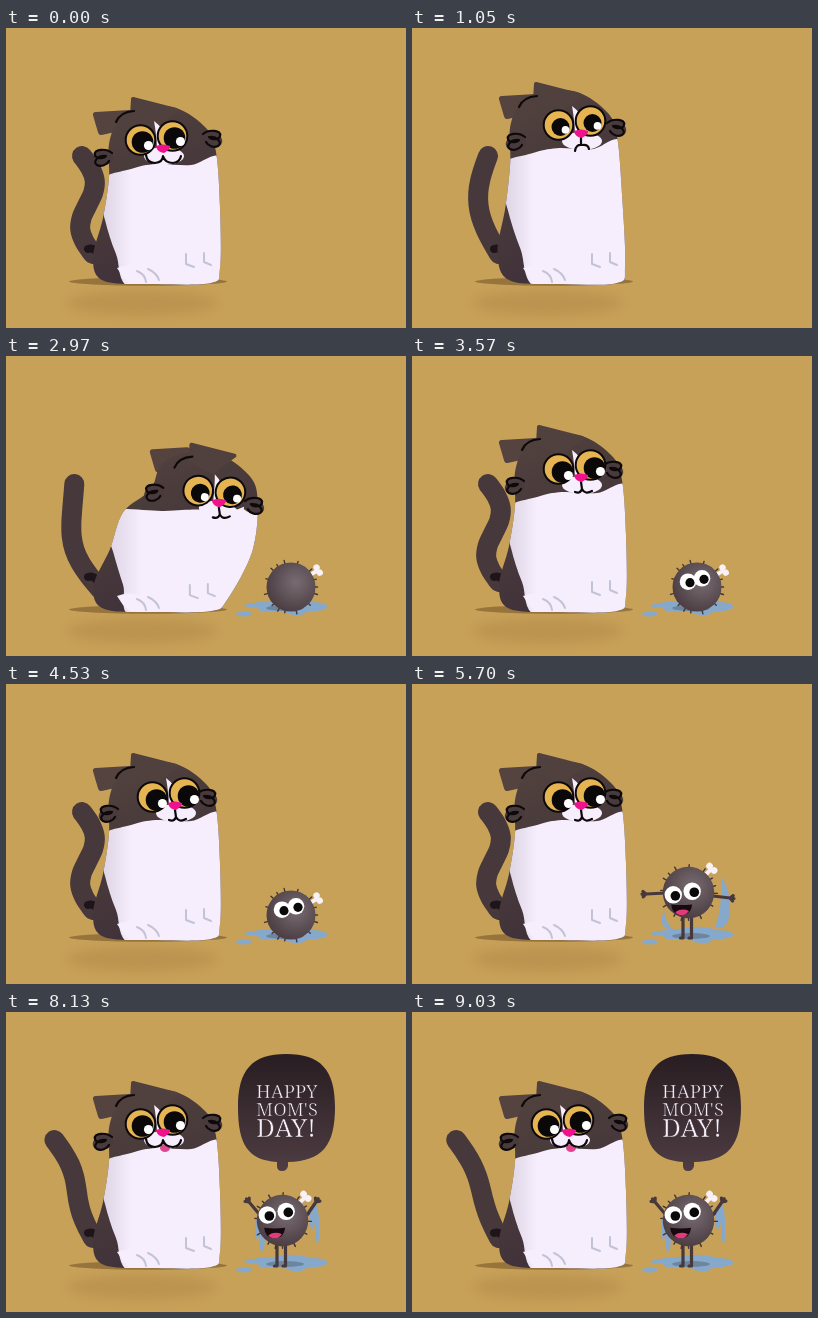
Recreate the animation shown at these times as an HTML page. Size 400x300 px, loop 9060 ms.

```html
<!DOCTYPE html>
<html lang="en">
<head>
<meta charset="utf-8">
<title>Cat and hairball</title>
<style>
html, body { margin: 0; width: 100%; height: 100%; overflow: hidden; background: #c8a159; }
svg { display: block; width: 100vw; height: 100vh; }
path { stroke-linecap: round; stroke-linejoin: round; }
.ink { fill: none; stroke: #0d090b; stroke-width: 2.2; }
.toe { fill: none; stroke: #c3c3d8; stroke-width: 2; }
.limb { fill: none; stroke: #46383b; stroke-width: 3.2; }
text { font-family: "Noto Serif", "Liberation Serif", serif; font-weight: 300; fill: #f6effa; stroke: #33272c; stroke-width: .5; }
</style>
</head>
<body>
<svg viewBox="0 0 400 300">
  <defs>
    <linearGradient id="fur" x1="0" y1="0" x2=".4" y2="1">
      <stop offset="0" stop-color="#54433f"/><stop offset=".5" stop-color="#483a3b"/><stop offset="1" stop-color="#40313a"/>
    </linearGradient>
    <linearGradient id="white">
      <stop offset="0" stop-color="#d8cedf"/><stop offset=".25" stop-color="#f6eefc"/>
    </linearGradient>
    <linearGradient id="night" x2="0" y2="1">
      <stop offset="0" stop-color="#281d22"/><stop offset="1" stop-color="#4e3d42"/>
    </linearGradient>
    <radialGradient id="hair" cx=".6" cy=".4" r=".65">
      <stop offset="0" stop-color="#786c72"/><stop offset="1" stop-color="#4a3c41"/>
    </radialGradient>
    <filter id="soft" x="-30%" y="-90%" width="160%" height="280%"><feGaussianBlur stdDeviation="6"/></filter>
    <clipPath id="bodyClip"><path id="clipShape"/></clipPath>
    <g id="tuft">
      <path fill="#493a3c" d="M-9-5C-2-11 11-10 9-3C14 2 10 9 4 8C-2 8-6 5-9 3Z"/>
      <path class="ink" d="M-8-5C-2-10 11-9 9-3C8 1 0 1-2-2C6-3 12 4 7 7C3 9-3 7-5 3"/>
    </g>
    <g id="eye">
      <circle r="14.800" fill="#e6b552" stroke="#0d090b" stroke-width="2"/>
      <g class="pupil"><circle r="1" fill="#0b080a"/><circle cx=".55" cy=".32" r=".42" fill="#fff"/></g>
    </g>
    <g id="ballEye"><circle r="8.300" fill="#fff"/><circle cx="2" cy="1" r="4.600" fill="#0b080a"/></g>
  </defs>
  <rect width="400" height="300" fill="#c8a159"/>
  <ellipse cx="136" cy="275" rx="76" ry="13" fill="#a87f40" opacity=".38" filter="url(#soft)"/>
  <ellipse cx="142" cy="253.500" rx="79" ry="4.200" fill="#8c6936" opacity=".8"/>

  <path id="tail" fill="none" stroke="#47393b" stroke-width="20"/>
  <path d="M82 221Q88 219 92 226" fill="none" stroke="#1e151a" stroke-width="8"/>
  <path id="earL" fill="#54433f" stroke="#54433f" stroke-width="6" d="M90 87L124 85V100L104 102L95 104Z"/>
  <path id="body" fill="url(#fur)"/>
  <g id="earR">
    <path fill="#50403e" stroke="#50403e" stroke-width="4" d="M127 71L170 82L148 98L126 87Z"/>
    <path class="ink" d="M110 94Q114 84 128 83"/>
  </g>
  <g clip-path="url(#bodyClip)"><path id="belly" fill="url(#white)"/></g>
  <path id="paw" class="toe" d="M180 226V236L188 239M198 225V234L205 237"/>
  <path fill="#f6eefc" d="M111 240Q122 235 138 240Q153 239 156 254Q144 257 124 255Q119 251 117 249Z"/>
  <path class="toe" d="M131 243Q139 246 140 254M142 241Q151 245 153 252"/>

  <use id="tuftL" href="#tuft"/>
  <use id="tuftR" href="#tuft"/>
  <g id="face">
    <path fill="#f6eefc" d="M-9-28Q1-21 7-5L-6-2Q-7-17-9-28Z"/>
    <ellipse cx="1" cy="7" rx="20" ry="9" fill="#f6eefc"/>
    <use id="eyeL" href="#eye"/>
    <use id="eyeR" href="#eye"/>
  </g>
  <g id="mouth">
    <g id="gape">
      <path fill="#790c34" stroke="#260812" d="M-16 8Q-3 3 11 8Q10 28 12 42Q15 67-10 69Q-34 70-31 52Q-20 32-16 8Z"/>
      <path fill="#d9489c" d="M-23 30Q-12 23-6 34Q2 48-9 51Q-24 55-31 50Q-29 41-23 30Z"/>
      <path fill="#fff" d="M-16 8L-12 18L-7 7ZM0 7L3 17L8 8Z"/>
    </g>
    <ellipse id="tongue" cx="2" cy="15" rx="5" ry="4" fill="#e2458f"/>
    <path id="smile" class="ink" d="M-17 6Q-16 14-8 14Q0 13 0 7Q2 14 10 14Q17 13 18 7"/>
    <path id="frown" class="ink" d="M0 3V10M-6 17Q-5 10 1 11Q7 10 8 15"/>
    <path id="small" class="ink" d="M0 4L1 11Q-1 16-6 14M1 11Q4 17 11 13"/>
    <path fill="#f0128c" d="M-7-3Q0-6 7-3Q8 0 1 4Q-6 3-7-3Z"/>
  </g>

  <g id="puddle" fill="#86a8ca">
    <path d="M-41-2Q-25-6-12-6Q10-11 25-5Q44-5 42 1Q34 5 22 4Q21 9 7 8Q0 4-15 4Q-30 5-27 0Q-38 2-41-2Z"/>
    <ellipse cx="-41" cy="7" rx="8" ry="2.500"/>
  </g>
  <ellipse id="ballShadow" cx="279" cy="252" rx="19" ry="3" fill="#5e6e80" opacity=".6"/>
  <path id="splash" fill="#86a8ca" d="M309 192Q322 212 316 238Q309 247 303 243Q311 222 309 192ZM252 225Q253 240 262 246Q253 246 249 238Z"/>
  <path id="drips" fill="#86a8ca" d="M303 198L311 193Q314 205 313 228Q311 233 309 228V210Q307 222 304 214ZM249 205L257 212Q260 224 258 238Q255 242 254 235L252 222Q250 232 249 226Z"/>
  <path id="limbs" class="limb"/>
  <g id="ball">
    <g id="roll">
      <path id="spikes" stroke="#41353a" stroke-width="1.400"/>
      <g id="bone" fill="#f8f1f8" transform="rotate(-32)">
        <path d="M20-2H31V2H20Z"/><circle cx="32" cy="-3" r="3.200"/><circle cx="32" cy="3" r="3.200"/>
      </g>
      <circle r="24.500" fill="url(#hair)"/>
    </g>
    <path id="curl" class="ink" d="M-5-15C4-14 2-6-3-5C3-5 4 7-5 7"/>
    <g id="ballFace">
      <use id="ballEyeL" href="#ballEye"/>
      <use id="ballEyeR" href="#ballEye"/>
      <g id="ballMouth">
        <path fill="#17090d" d="M-10-4Q0-3 10-4Q9 6 0 6Q-9 6-10-4Z"/>
        <path fill="#e23a7a" d="M-6 3Q0-1 7 2Q4 6 0 6Q-4 6-6 3Z"/>
      </g>
    </g>
  </g>

  <g id="bubble">
    <path fill="url(#night)" d="M280 42C315 42 329 58 329 95C329 133 317 149 282 150V154Q281 159 276 159Q271 159 271 154V150C242 148 232 133 232 95C232 58 246 42 280 42Z"/>
    <text x="250" y="86" font-size="18.500">HAPPY</text>
    <text x="250" y="103.500" font-size="18.300">MOM'S</text>
    <text x="250" y="124.500" font-size="26">DAY!</text>
  </g>
</svg>
<script>
const LOOP = 9060;
const el = {};
document.querySelectorAll('[id]').forEach(n => el[n.id] = n);
const pupils = document.querySelectorAll('.pupil');

// The seated outlines; every other pose bends these.
const BODY = [[103,150], [103,116], [113,92], [135,80], [170,80], [200,100], [210,124],
  [214,180], [214,240], [205,255], [150,256], [98,253], [87,230], [97,190]];
const BELLY = [[92,154], [125,141], [150,136], [185,137], [216,131],
  [225,200], [220,262], [128,262], [110,226], [99,192]];

const clamp = v => Math.max(0, Math.min(1, v));
const lerp = (a, b, u) => a + (b - a) * u;
const span = (t, a, b) => clamp((t - a) / (b - a));
const ramp = (t, a, b) => { const u = span(t, a, b); return u * u * (3 - 2 * u); };
const spring = (t, a, b, over = 1) => {
  const u = span(t, a, b) - 1;
  return 1 + (over + 1) * u ** 3 + over * u * u;
};
const waves = (t, a, b, count) => Math.sin(span(t, a, b) * Math.PI * count);
const blink = (t, ...times) => 1 - .92 * Math.max(0, ...times.map(m => 1 - Math.abs(t - m) / 90));

const show = (node, on) => node.style.display = on ? '' : 'none';
const place = (node, x, y, sx = 1, sy = sx, turn = 0) =>
  node.setAttribute('transform', `translate(${x} ${y}) rotate(${turn}) scale(${sx} ${sy})`);

function spline(points, closed) {
  const n = points.length;
  const at = i => points[closed ? (i + n) % n : Math.max(0, Math.min(n - 1, i))];
  let d = 'M' + at(0);
  for (let i = 0; i < (closed ? n : n - 1); i++) {
    const [a, b, c, e] = [at(i - 1), at(i), at(i + 1), at(i + 2)];
    const c1 = b.map((v, j) => v + (c[j] - a[j]) / 6);
    const c2 = c.map((v, j) => v - (e[j] - b[j]) / 6);
    d += `C${c1} ${c2} ${c}`;
  }
  return d + (closed ? 'Z' : '');
}

// The floor holds still, the head moves fully and the rump stays behind.
function bend([x, y], tall, crouch) {
  const height = Math.sin(clamp((255 - y) / 130) * Math.PI / 2);
  const front = clamp((x - 85) / 50 + Math.max(0, (140 - y) / 20));
  return [x + height * (54 * crouch * front - 5 * tall),
          y + height * (23 * crouch * front - 16 * tall)];
}

function tailPath(lean, wave, bow, base) {
  const points = [];
  for (let i = 0; i <= 8; i++) {
    const s = i / 8;
    points.push([87 + base + lean * s + wave * Math.sin(2 * Math.PI * s) + bow * Math.sin(Math.PI * s),
                 lerp(226 + base, 128, s)]);
  }
  return spline(points, false);
}

function drawCat(t) {
  const heave = .3 * waves(t, 1250, 1850, 2) ** 2;
  const crouch = heave + spring(t, 1870, 2090) - ramp(t, 2840, 3260);
  const up = 1 - crouch;
  const tall = spring(t, 480, 880) * (1 - ramp(t, 2200, 2400)) * up;
  const watch = (ramp(t, 2300, 2400) - ramp(t, 6600, 6900)) * up;
  const open = ramp(t, 1900, 2070) - ramp(t, 2480, 2720);
  const swing = 61 * ramp(t, 7500, 8850) - 30 * ramp(t, 8850, 9050);

  const shape = points => spline(points.map(p => bend(p, tall, crouch)), true);
  const outline = shape(BODY);
  el.body.setAttribute('d', outline);
  el.clipShape.setAttribute('d', outline);
  el.belly.setAttribute('d', shape(BELLY));

  const curl = clamp(1 - tall - crouch) * (1 - swing / 45);
  el.tail.setAttribute('d', tailPath(-11 - 19 * crouch - swing,
    -10 * Math.max(0, curl), -15 * tall - 20 * crouch + swing * .1, 9 * crouch));

  place(el.earL, 74 * crouch, 12 * crouch - 16 * tall);
  place(el.earR, 76 * crouch - 3 * tall, 23 * crouch - 15 * tall);
  place(el.paw, 5 * crouch, 4 * crouch);
  place(el.tuftL, 98 + 65 * crouch + 7 * tall + 6 * watch, 130 + 9 * crouch - 16 * tall, -1, 1);
  place(el.tuftR, 205 + 56 * crouch - 2 * tall - 5 * watch, 111 + 50 * crouch - 11 * tall + 3 * watch);

  const x = 157 + 69 * crouch + 12 * (tall + watch);
  const y = 121 + 34 * crouch - 15 * tall + watch;
  const lids = blink(t, 4150, 5150, 6650, 7950);
  place(el.face, x, y, 1, 1, 13 * crouch);
  place(el.mouth, x, y);
  place(el.eyeL, -22.500, -9, 1, lids);
  place(el.eyeR, 9.500, -13, 1, lids);
  const pupil = 10.800 - 1.800 * clamp(tall + crouch);
  pupils.forEach(p => place(p, 2 + 2 * watch, 2 + watch, pupil));

  const gaping = open > .04;
  const worried = t >= 620 && t < 2720;
  const watching = t >= 2720 && t < 6750;
  place(el.gape, 0, 0, lerp(.6, 1, open), open);
  show(el.gape, gaping);
  show(el.frown, worried && !gaping);
  show(el.small, watching);
  show(el.smile, !worried && !watching);
  show(el.tongue, t >= 6750);
}

function limb(x0, y0, x1, y1) {
  const a = Math.atan2(y1 - y0, x1 - x0);
  const fingers = [-.75, 0, .75].map(k => `M${x1} ${y1}l${4 * Math.cos(a + k)} ${4 * Math.sin(a + k)}`);
  return `M${x0} ${y0}L${x1} ${y1}` + fingers.join('');
}

function drawBall(t) {
  const flight = span(t, 2130, 2480);
  const stand = ramp(t, 5610, 5690);
  const raise = spring(t, 5900, 6250, 1.700);
  const bounce = 9 * Math.abs(waves(t, 2480, 2720, 1)) + 8 * waves(t, 5610, 5700, 1);
  const x = lerp(206, 285, flight) - 8.500 * stand;
  const y = lerp(199, 231, flight) - 22.500 * stand - bounce;
  const size = 1.080 * ramp(t, 2090, 2220) - .08 * ramp(t, 2280, 2480) + .05 * stand;
  const roll = -180 * (1 - ramp(t, 2130, 2750)) - 14 * stand + 7 * waves(t, 3800, 4500, 4);

  show(el.ball, t > 2110);
  place(el.ball, x, y, size);
  place(el.roll, 0, 0, 1, 1, roll);
  show(el.bone, t > 2350);
  show(el.curl, t < 2430);
  place(el.puddle, 279, 251, ramp(t, 2420, 2780));
  show(el.ballShadow, t > 2450);

  const awake = spring(t, 3200, 3400, 1.700);
  const lids = blink(t, 4000, 4900, 5300, 7700);
  const spread = 7 + 2 * stand;
  show(el.ballFace, awake > .02);
  place(el.ballFace, -2 - 3.500 * stand, -7 + 7.500 * (stand - raise), awake);
  place(el.ballEyeL, -spread, 1.700, 1, lids);
  place(el.ballEyeR, spread, -1.700, 1, lids);
  place(el.ballMouth, -1 - raise, 15 + 3 * raise, 1, 1 - .15 * (1 - Math.cos(span(t, 6150, 7100) * Math.PI * 8)));

  const standing = stand > .3;
  const lift = y - 208.500;
  [el.limbs, el.ballMouth].forEach(n => show(n, standing));
  show(el.splash, standing && raise < .5);
  show(el.drips, raise >= .5);
  el.limbs.setAttribute('d',
    limb(254, 209 - 6 * raise + lift, 234 + 9 * raise, 210 - 20 * raise + lift) +
    limb(301, 212 - 9 * raise + lift, 318 - 8 * raise, 214 - 24 * raise + lift) +
    [271, 279.500].map(k => `M${k} ${232 + lift}V254h-2.500`).join(''));

  const pop = spring(t, 5980, 6300, 1.900);
  show(el.bubble, pop > .01);
  el.bubble.setAttribute('transform', `translate(276 158) scale(${pop}) translate(-276 -158)`);
}

let spikes = '';
for (let i = 0; i < 15; i++) {
  const a = i * Math.PI * 2 / 15 + .15 * Math.sin(i * 5);
  const dir = [Math.cos(a), Math.sin(a)];
  spikes += `M${dir.map(v => 22 * v)}L${dir.map(v => (26.500 + i % 2) * v)}`;
}
el.spikes.setAttribute('d', spikes);

const start = performance.now();
function tick() {
  const t = (performance.now() - start) % LOOP;
  drawCat(t);
  drawBall(t);
  requestAnimationFrame(tick);
}
tick();
</script>
</body>
</html>
```
